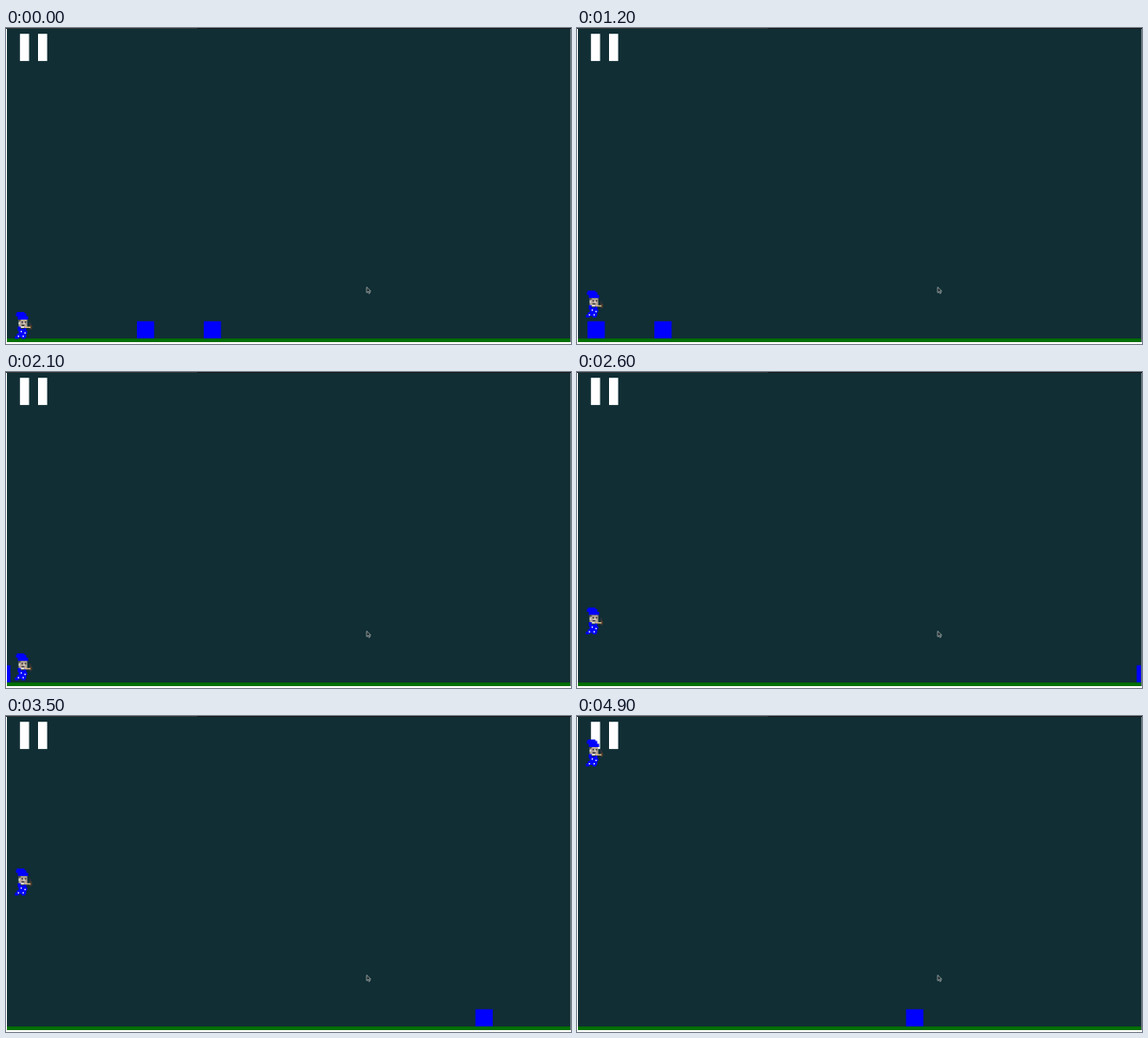
Animation, 600 px wide and 336 px high, one loop 5000 ms. Source, as an HTML page:

```html
<!DOCTYPE html>
<html lang="en">
<head>
<meta charset="utf-8">
<title>Jumping wizard</title>
<style>
  html, body { margin: 0; width: 100%; height: 100%; overflow: hidden; background: #102e34; }
  svg { display: block; width: 100vw; height: 100vh; }
</style>
</head>
<body>
<svg viewBox="0 0 600 336">
  <rect width="600" height="336" fill="#102e34"/>
  <g id="blocks" fill="#00f"></g>
  <g fill="#fff">
    <rect x="14.800" y="6.200" width="9.700" height="28.900"/>
    <rect x="34" y="6.200" width="9.700" height="28.900"/>
  </g>
  <rect y="330.200" width="600" height="3.800" fill="#007000"/>
  <rect y="334" width="600" height="2" fill="#fff"/>
  <rect width="600" height="1" fill="#171a1b"/>
  <rect width="203" height="1" fill="#303435"/>
  <rect y="1" width="1" height="333" fill="#fff"/>
  <rect x="599" y="1" width="1" height="333" fill="#69797c"/>

  <!-- wizard, top left corner of the hat at 0,0 -->
  <g id="wizard">
    <path fill="#00f" d="M2 0h8v1.500h2v3h2V8H3V4.500H1V1.500h1z"/>
    <path fill="#b5a596" d="M4 8h9v8H4z"/>
    <path fill="#343238" d="M4 8h2v1.500H4zM7 10h1.500v1.500H7zM10.500 10H12v1.500h-1.500zM7 13.500h3V15H7zM15.500 11H17v8h-1.500z"/>
    <path fill="#ded9d2" d="M4 11h1.500v2H4zM9 11.500h1.500V13H9zM6 15h4v2H6z"/>
    <path fill="#00f" d="M3 15.500h3V18h4v-1.500h2V20h1v3h-1v4h-1v1.500H7V27H4v1.500H0v-3h2V23h2v-3H3z"/>
    <path fill="#d6b681" d="M10 15.500h6.500V17H10z"/>
    <path fill="#563d27" d="M16.500 14H18v4h-1.500z"/>
    <path fill="#dcdcf5" d="M6 20h1.500v1.500H6zM10 21.500h1.500V23H10zM3 25h1.500v1.500H3zM8 25h1.500v1.500H8z"/>
  </g>

  <path d="M383 275.500v6l1.500-1.300 1 2.200 1-.5-1-2.100h1.900z" fill="#10191b"
        stroke="#c3cbcc" stroke-width=".7"/>
</svg>
<script>
  const LOOP = 5000, STEP = 100;
  const SCROLL = 0.1065, CLIMB = 0.098;
  const GROUND = 302;
  const starts = [139, 210, 871.3];

  // Times at which the flight direction flips, beginning with a rise.
  const turns = [790, 1111, 1433, 1781, 2101];

  const wizard = document.getElementById("wizard");
  const group = document.getElementById("blocks");
  const blocks = starts.map(() => {
    const block = document.createElementNS("http://www.w3.org/2000/svg", "rect");
    block.setAttribute("y", 311.8);
    block.setAttribute("width", 18.3);
    block.setAttribute("height", 18.4);
    return group.appendChild(block);
  });

  function height(time) {
    let y = GROUND;
    turns.forEach((from, i) => {
      const to = turns[i + 1] ?? LOOP;
      const span = Math.max(0, Math.min(time, to) - from);
      y += (i % 2 ? 1 : -1) * CLIMB * span;
    });
    return Math.min(GROUND, y);
  }

  function draw(time) {
    blocks.forEach((block, i) => {
      block.setAttribute("x", starts[i] - SCROLL * time);
    });
    wizard.setAttribute("transform", `translate(9.500 ${height(time)})`);
  }

  function tick() {
    const time = performance.now() % LOOP;
    draw(Math.floor(time / STEP) * STEP);
    requestAnimationFrame(tick);
  }
  tick();
</script>
</body>
</html>
```
